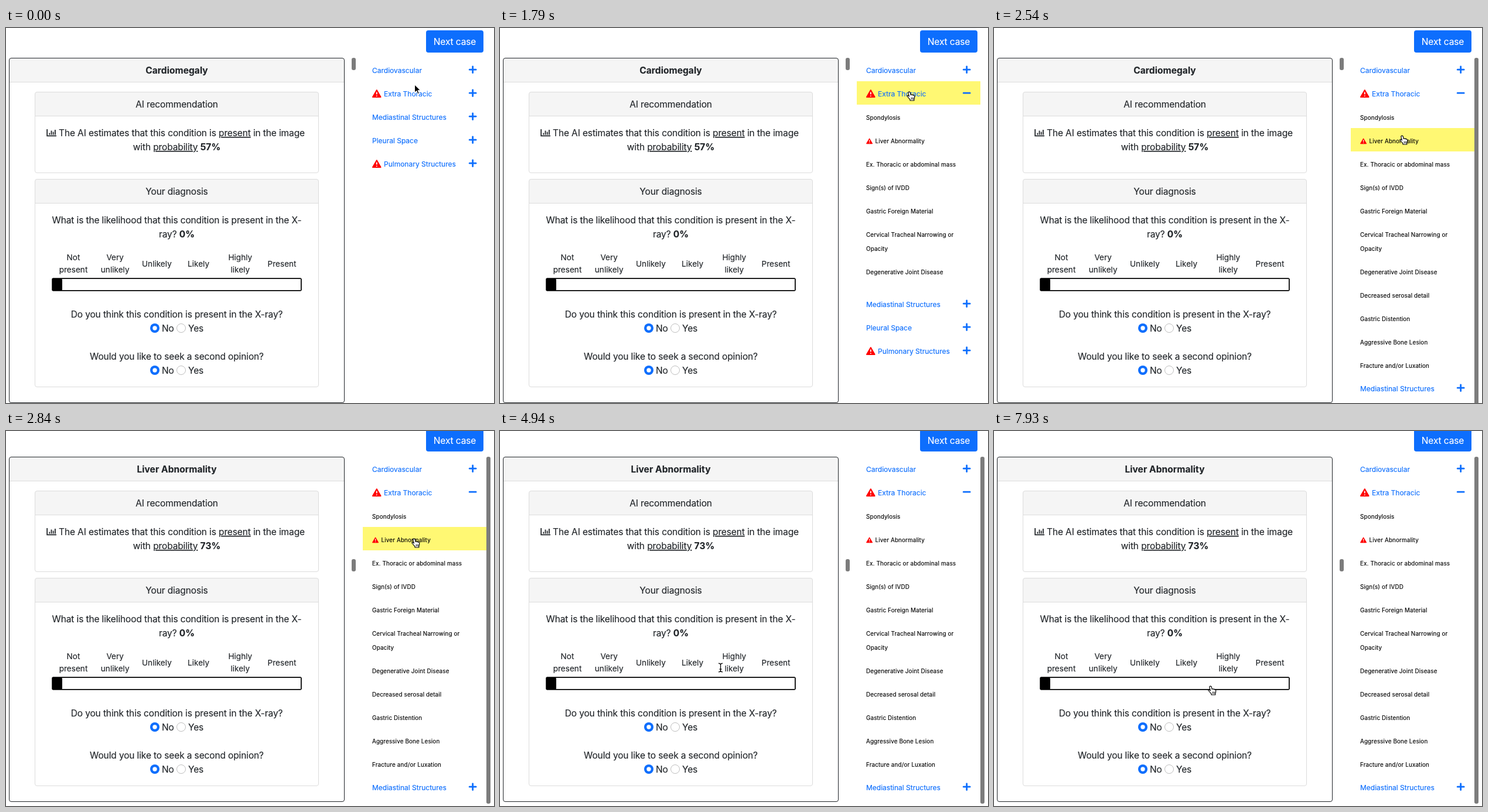
An HTML page that plays this animation: 833x641 px, repeating every 8000 ms.

```html
<!DOCTYPE html>
<html lang="en">
<head>
<meta charset="utf-8">
<title>Diagnosis form</title>
<style>
  html, body { margin: 0; width: 100%; height: 100%; overflow: hidden; background: #fff; }
  svg { display: block; }
  text {
    font: 15.5px Inter, "Open Sans", sans-serif; letter-spacing: -.008em; font-optical-sizing: none;
    color: #212529; fill: currentColor; stroke: currentColor; stroke-width: .15px;
  }
  .mid { text-anchor: middle; }
  .bold { font-weight: 700; letter-spacing: .004em; }
  .scale { font-size: 13.6px; letter-spacing: 0; }
  .link { font-size: 12px; letter-spacing: 0; color: #0d6efd; }
  .item { font-size: 9.8px; letter-spacing: .018em; color: #000; }
  .white { color: #fff; }
  .under { text-decoration: underline; }
  .bar { fill: #7c7c7c; }
  .track { filter: drop-shadow(0 0 .7px #000); }
</style>
</head>
<body>
<svg id="stage" width="833" height="641" viewBox="0 0 833 641"></svg>
<script>
const LOOP = 8000, LIST_TOP = 131, LIST_HEIGHT = 464, SCROLL_AT = 2840, SCROLL = 7;
const BLUE = '#0d6efd', MIDDLE = 291.5;

const text = (x, y, s, cls = '') => `<text x="${x}" y="${y}" class="${cls}">${s}</text>`;
const centered = (y, s, cls = '') => text(MIDDLE, y, s, 'mid ' + cls);

const panel = (y, bottom, title) => `
  <path d="M49.5 ${y + 41}V${y + 3.5}q0-3.5 3.5-3.5H530q3.5 0 3.5 3.5V${y + 41}z" fill="#f5f5f5"/>
  <path d="M49.5 ${y + 41}H533.5" stroke="#dcdcdc"/>
  <rect x="49.5" y="${y}" width="484" height="${bottom - y}" rx="3.5" fill="none" stroke="#dcdcdc"/>
  ${centered(y + 26.5, title)}`;

const warning = (x, y, size) => `
  <g transform="translate(${x} ${y}) scale(${size})">
    <path d="M8 1.2L14.8 13H1.2z" fill="#f00" stroke="#f00" stroke-width="2" stroke-linejoin="round"/>
    <path d="M8 4.4V8.6M8 10.4V12" stroke="#fff" stroke-width="1.8"/>
  </g>`;

const radios = y => `
  <circle cx="254" cy="${y}" r="8" fill="${BLUE}"/><circle cx="254" cy="${y}" r="3.7" fill="#fff"/>
  <circle cx="299" cy="${y}" r="7.5" fill="#fff" stroke="#bfbfbf"/>
  ${text(266, y + 5.7, 'No')}${text(311, y + 5.7, 'Yes')}`;

const scaleLabels = ['Not present', 'Very unlikely', 'Unlikely', 'Likely', 'Highly likely', 'Present']
  .map((label, i) => {
    const lines = label.split(' '), x = 115 + i * 71.2;
    return lines.map((s, n) => text(x, (lines.length > 1 ? 397 : 408) + n * 21, s, 'mid scale')).join('');
  }).join('');

const category = (name, i, alert) => {
  const y = 72 + i * 40;
  const stroke = (d, id = '') =>
    `<path ${id} d="${d}" stroke="${BLUE}" stroke-width="2.8" stroke-linecap="round"/>`;
  return (alert ? warning(624.8, y - 7, 1) : '') + text(alert ? 645 : 625, y + 5, name, 'link') +
    stroke(`M791.3 ${y - .8}h10.8`) +
    stroke(`M796.7 ${y - 6.2}v10.8`, i === 1 ? 'id="upright"' : '');
};

let itemY = 157;
const items = ['Spondylosis', 'Liver Abnormality', 'Ex. Thoracic or abdominal mass', 'Sign(s) of IVDD',
  'Gastric Foreign Material', 'Cervical Tracheal Narrowing or|Opacity', 'Degenerative Joint Disease',
  'Decreased serosal detail', 'Gastric Distention', 'Aggressive Bone Lesion', 'Fracture and/or Luxation']
  .map((name, i) => {
    const alert = i === 1, lines = name.split('|');
    const out = (alert ? warning(625, itemY - 8.6, .7) : '') +
      lines.map((s, n) => text(alert ? 640.5 : 625, itemY + n * 24, s, 'item')).join('');
    itemY += 16 + 24 * lines.length;
    return out;
  }).join('');

const cursors = `
  <path id="arrow" d="M0 0V14.2L3.3 11.2L5.5 16.2L7.9 15.2L5.8 10.3H10.3z" fill="#000" stroke="#fff" stroke-width="1.1"/>
  <g id="hand" stroke="#000" stroke-linecap="round" stroke-linejoin="round">
    <path transform="translate(-7.5 -8.5)" fill="#fff" stroke-width="1.2" d="M4.2 1.2c1.2-.3 2 .5 2.2 1.6l.7 3.6c.3-.9 2-.9 2.3.2.6-.8 2.1-.5 2.2.6.9-.6 2 .1 2.1 1.2 0 2.3 0 3.8-.9 5.3V16H6v-1.6C4.6 12.8 2.6 10.2 1.2 8.9c-.8-1 .4-2.2 1.7-1.4l1.4 1.3L2.9 3.2C2.6 2.1 3.2 1.4 4.2 1.2z"/>
    <path transform="translate(-7.5 -8.5)" stroke-width=".8" d="M8.1 11v3M9.9 11v3M11.7 11v3"/>
  </g>
  <g id="beam" fill="none">
    ${['#fff" stroke-width="3', '#000" stroke-width="1.3'].map(s =>
      `<path stroke="${s}" d="M-3.5-7.3Q0-7.3 0-5V5Q0 7.3-3.5 7.3M3.5-7.3Q0-7.3 0-5M0 5Q0 7.3 3.5 7.3M-2 2.6H2"/>`).join('')}
  </g>`;

const stage = document.getElementById('stage');
stage.innerHTML = `
<clipPath id="fold"><rect id="foldBox" x="600" y="${LIST_TOP}" width="233" height="0"/></clipPath>
<g id="page">
  <rect x="717" y="4" width="98" height="38" rx="4" fill="${BLUE}"/>
  ${text(766, 29, 'Next case', 'mid white')}

  <path d="M5.5 92.5V55q0-3.5 3.5-3.5H574q3.5 0 3.5 3.5V92.5z" fill="#f5f5f5"/>
  <path d="M6 92.5H577" stroke="#dcdcdc"/>
  <rect x="5.5" y="51.5" width="572" height="589" rx="3.5" fill="none" stroke="#212529"/>
  <text id="title" x="${MIDDLE}" y="78" class="mid bold"></text>

  ${panel(109.5, 247.5, 'AI recommendation')}
  <path d="M70.2 173V184.3H86M74.3 182.5v-3M77.5 182.5v-7M80.7 182.5v-5M83.9 182.5v-8.5" fill="none" stroke="#212529" stroke-width="1.8"/>
  ${text(90, 185, 'The AI estimates that this condition is <tspan class="under">present</tspan> in the image')}
  ${centered(209, 'with <tspan class="under">probability</tspan> <tspan id="percent" class="bold"></tspan>')}

  ${panel(258.5, 613.5, 'Your diagnosis')}
  ${centered(334, 'What is the likelihood that this condition is present in the X-')}
  ${centered(358, 'ray? <tspan class="bold">0%</tspan>')}
  ${scaleLabels}
  <rect class="track" x="79.25" y="428.25" width="424.5" height="20.5" rx="1" fill="#fff" stroke="#000" stroke-width="1.5"/>
  <rect x="79" y="428.5" width="17" height="20.5" rx="2"/>
  ${centered(495, 'Do you think this condition is present in the X-ray?')}
  ${radios(513)}
  ${centered(567, 'Would you like to seek a second opinion?')}
  ${radios(585)}
  <rect id="leftBar" class="bar" x="590" width="7" height="21" rx="3"/>

  <rect id="highlight" x="609" width="211" height="40" fill="#fff873"/>
  ${category('Cardiovascular', 0)}
  ${category('Extra Thoracic', 1, true)}
  <g clip-path="url(#fold)">${items}</g>
  <g id="below">
    ${category('Mediastinal Structures', 2)}
    ${category('Pleural Space', 3)}
    ${category('Pulmonary Structures', 4, true)}
  </g>
  <rect id="rightBar" class="bar" x="820" y="51" width="7" height="593" rx="3"/>
</g>
<g id="pointer">${cursors}</g>`;

// Pointer steps: time, shape, x, y
const moves = [
  [0, 'arrow', 697.5, 96.5], [300, 'arrow', 697.5, 90], [450, 'arrow', 697.5, 85], [590, 'arrow', 697.5, 95],
  [1190, 'hand', 701, 114], [1340, 'hand', 701.5, 116.5],
  [1940, 'hand', 701, 122], [2090, 'hand', 700, 154], [2240, 'hand', 699.5, 177.5],
  [2390, 'hand', 699.5, 186], [2540, 'hand', 699.5, 191.5],
  [4190, 'hand', 684, 203], [4340, 'arrow', 612, 246], [4490, 'arrow', 520, 300], [4640, 'arrow', 440, 352],
  [4790, 'arrow', 392, 385], [4940, 'beam', 376.5, 404.5], [5080, 'hand', 378, 427], [5230, 'hand', 383, 441],
  [5380, 'hand', 395, 441], [5530, 'hand', 408, 442], [5680, 'hand', 412, 443],
  [6430, 'hand', 410, 443], [6580, 'hand', 407, 442.5], [6730, 'hand', 405, 442.5],
  [7780, 'hand', 390, 442.5], [7930, 'hand', 372.5, 443.5]
];
// Unfolding of the list: time, height
const folds = [[0, 0], [1640, 40], [1790, 320], [1940, LIST_HEIGHT]];

const $ = id => document.getElementById(id);
const latest = (steps, t) => steps.findLast(step => step[0] <= t);
const show = (id, on) => $(id).setAttribute('visibility', on ? 'visible' : 'hidden');

function draw(t) {
  const scrolled = t >= SCROLL_AT, offset = scrolled ? SCROLL : 0;
  const [, shape, x, y] = latest(moves, t);
  const open = latest(folds, t)[1];

  $('page').setAttribute('transform', `translate(0 ${-offset})`);
  $('title').textContent = scrolled ? 'Liver Abnormality' : 'Cardiomegaly';
  $('percent').textContent = scrolled ? '73%' : '57%';
  $('leftBar').setAttribute('y', scrolled ? 226 : 51);

  $('foldBox').setAttribute('height', open);
  $('below').setAttribute('transform', `translate(0 ${open})`);
  show('upright', !open);
  show('rightBar', open === LIST_HEIGHT);

  // The row under the fingertip lights up
  const row = Math.floor((y - 8 + offset - 91) / 40);
  $('highlight').setAttribute('y', 91 + row * 40);
  show('highlight', shape === 'hand' && x > 609);

  $('pointer').setAttribute('transform', `translate(${x} ${y})`);
  for (const id of ['arrow', 'hand', 'beam']) show(id, id === shape);
}

function tick() {
  draw(performance.now() % LOOP);
  requestAnimationFrame(tick);
}
tick();
</script>
</body>
</html>
```
